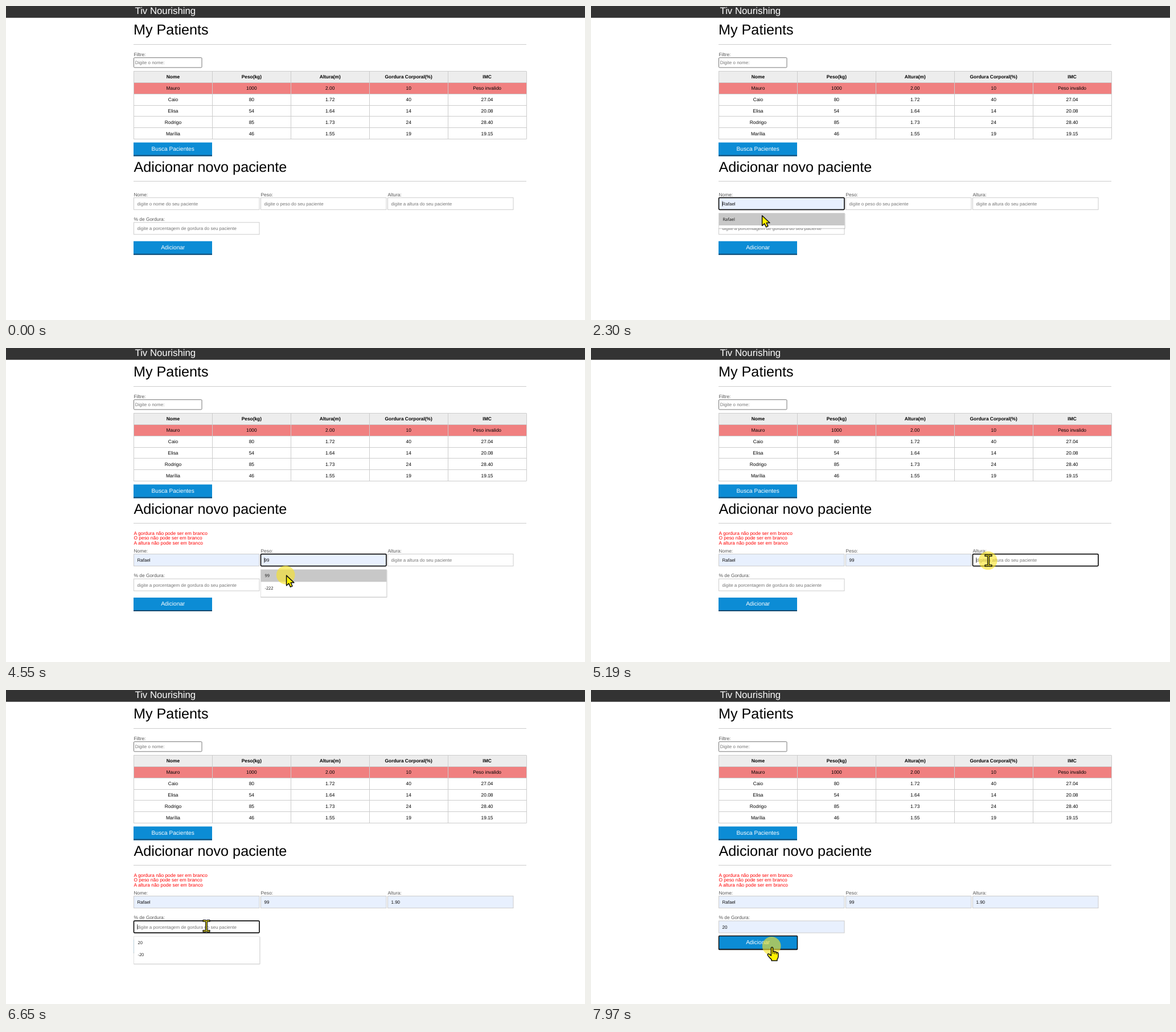
An HTML page for the animation above (8000 ms loop, 1017 by 551 pixels).

```html
<!DOCTYPE html>
<html lang="pt">
<head>
<meta charset="utf-8">
<title>Pacientes</title>
<style>
  html, body { margin: 0; width: 100%; height: 100%; overflow: hidden; background: #fff; }
  svg { display: block; width: 1017px; height: 551px; }
  text { font-family: "Liberation Sans", Arial, sans-serif; text-rendering: geometricPrecision; }
  .option { font-family: "Open Sans", "Noto Sans", sans-serif; }
</style>
</head>
<body>
<svg viewBox="0 0 1017 551"><g id="page"></g><g id="form"></g><g id="pointer"></g></svg>
<script>
const LOOP = 8000;
const LEFT = 224.5, RIGHT = 914, COL = (RIGHT - LEFT) / 5;
const FIELD_W = 221, FIELD_H = 21.5, OPTION_H = 21.5;
const ERRORS_AT = 3070, ERRORS_H = 25.3;

// Bursts of screen updates: first, last, count
const bursts = [
  [200, 970, 8], [1090, 1760, 7], [2080, 2860, 8], [2960, 3740, 8], [3860, 4650, 8],
  [4750, 5530, 8], [5650, 6410, 8], [6530, 7310, 8], [7410, 7970, 6]
];
const steps = [0];
for (const [first, last, count] of bursts)
  for (let i = 0; i < count; i++)
    steps.push(Math.floor((first + (last - first) * i / (count - 1)) / 10) * 10);

// Pointer path: time, x, y, shape from that time on
const path = [
  [200, 926, 470, "arrow"], [310, 835, 393, "arrow"], [420, 740, 352, "beam"],
  [530, 650, 345, "beam"], [640, 553, 366, "arrow"], [750, 478, 382, "arrow"],
  [860, 410, 365, "arrow"], [970, 362, 346, "beam"], [1200, 308, 346, "beam"],
  [1310, 306, 346, "beam"], [1420, 304, 389, "arrow"], [1760, 300, 367, "arrow"],
  [2520, 300, 367, "arrow"], [2740, 314, 404, "arrow"], [2860, 318, 418, "hand"],
  [3070, 318, 418, "beam"], [3290, 328, 405, "arrow"], [3510, 339, 390, "arrow"],
  [3740, 440, 376, "beam"], [3970, 476, 373, "beam"], [4190, 481, 390, "arrow"],
  [4420, 483, 399, "arrow"], [4750, 510, 397, "arrow"], [4970, 640, 377, "beam"],
  [5190, 698, 373, "beam"], [5410, 698, 390, "arrow"], [5650, 698, 399, "arrow"],
  [5860, 666, 405, "arrow"], [6190, 440, 414, "beam"], [6410, 355, 414, "beam"],
  [6640, 352, 414, "beam"], [6750, 349, 428, "arrow"], [7080, 346, 442, "arrow"],
  [7190, 346.5, 435, "beam"], [7310, 338, 442, "hand"], [7630, 318, 451, "hand"]
];
const clicks = [
  [1200, 1420], [2410, 2520], [2960, 3070], [3970, 4190], [4530, 4650],
  [5190, 5400], [5650, 5750], [6410, 6640], [7080, 7190], [7960, LOOP]
];

// when: focus, list opens, option hovered, option picked, blur
const fields = [
  { x: 224.5, y: 336, label: "Nome:", hint: "digite o nome do seu paciente",
    options: ["Rafael"], when: [1200, 1310, 1420, 2520, 2960] },
  { x: 447.5, y: 336, label: "Peso:", hint: "digite o peso do seu paciente",
    options: ["99", "-222"], when: [3970, 4080, 4190, 4650, 5190] },
  { x: 670.5, y: 336, label: "Altura:", hint: "digite a altura do seu paciente",
    options: ["1.90", "2.22"], when: [5190, 5300, 5410, 5750, 6410] },
  { x: 224.5, y: 379.5, label: "% de Gordura:", hint: "digite a porcentagem de gordura do seu paciente",
    options: ["20", "-20"], when: [6410, 6640, 6750, 7190, 7960] }
];
const errors = ["gordura", "peso", "altura"].map(
  name => `${name === "peso" ? "O" : "A"} ${name} não pode ser em branco`);
const table = [
  ["Nome", "Peso(kg)", "Altura(m)", "Gordura Corporal(%)", "IMC"],
  ["Mauro", "1000", "2.00", "10", "Peso invalido"],
  ["Caio", "80", "1.72", "40", "27.04"],
  ["Elisa", "54", "1.64", "14", "20.08"],
  ["Rodrigo", "85", "1.73", "24", "28.40"],
  ["Marília", "46", "1.55", "19", "19.15"]
];

const within = (t, [from, to]) => t >= from && t < to;
const rect = (x, y, w, h, fill, extra = "") =>
  `<rect x="${x}" y="${y}" width="${w}" height="${h}" fill="${fill}" ${extra}/>`;
const text = (x, y, size, fill, str, extra = "") =>
  `<text x="${x}" y="${y}" font-size="${size}" fill="${fill}" ${extra}>${str}</text>`;
const centred = 'text-anchor="middle"';
const line = (x1, y1, x2, y2) =>
  `<path d="M${x1} ${y1}L${x2} ${y2}" stroke="#ccc" stroke-width="1"/>`;

function button(y, label, focused = false) {
  return rect(224, y, 138, 24, "#0c8cd5") +
    rect(224, y + 22, 138, 2, "#154a72") +
    text(293.2, y + 14.2, 10.1, "#fff", label, centred) +
    (focused ? rect(224.5, y - .3, 138, 24, "none", 'rx="1.2" stroke="#101010" stroke-width="1.5"') : "");
}

function drawTable() {
  const top = 114.5, rowH = 119 / 6;
  let out = rect(LEFT, top, RIGHT - LEFT, rowH, "#ededed") +
    rect(LEFT, top + rowH, RIGHT - LEFT, rowH, "#f08080");
  for (let i = 0; i <= 6; i++) {
    const y = Math.round(top + rowH * i - .5) + .5;
    out += line(LEFT - .5, y, RIGHT, y);
  }
  for (let i = 0; i <= 5; i++) {
    const x = Math.floor(LEFT + COL * i) + .5;
    out += line(x, top, x, top + rowH * 6);
  }
  table.forEach((row, r) => row.forEach((cell, c) => {
    out += text(LEFT + COL * (c + .5), top + rowH * (r + .5) + 3, 8.4, "#000", cell,
      centred + (r ? "" : ' font-weight="bold"'));
  }));
  return out;
}

function drawPage() {
  return rect(0, 0, 1017, 20.7, "#333") +
    text(226.5, 14, 16.8, "#fff", "Tiv Nourishing") +
    text(224, 50.3, 25.2, "#000", "My Patients") +
    line(224, 67.5, RIGHT, 67.5) +
    text(224.5, 87.5, 8.4, "#555", "Filtre:") +
    rect(224.5, 90.7, 119.5, 17.3, "#fff", 'rx="1.2" stroke="#767676"') +
    text(226.8, 102, 8, "#757575", "Digite o nome:") +
    drawTable() +
    button(239.5, "Busca Pacientes") +
    text(224.5, 290.5, 25.2, "#000", "Adicionar novo paciente") +
    line(224, 307.5, RIGHT, 307.5);
}

function drawField({ x, y, label, hint, options, when }, t, shift) {
  const [focus, , hover, pick, blur] = when;
  const top = y + shift, filled = t >= hover, focused = within(t, [focus, blur]);
  const value = filled ? options[0] : hint;
  let out = text(x, top - 2.5, 8.4, "#555", label) +
    rect(x, top + .3, FIELD_W - .5, FIELD_H - .5, filled ? "#e8f0fe" : "#fff",
      focused ? 'rx="1.5" stroke="#101010" stroke-width="1.7"' : 'stroke="#ccc"') +
    text(x + 6, top + 13.9, 8, filled ? "#111" : "#757575", value);
  if (focused) {
    const caret = x + 6 + (t > pick ? options[0].replace(".", "").length * 4.45 + (options[0].includes(".") ? 2.2 : 0) : 0);
    out += rect(caret, top + 6.5, .8, 9, "#000");
  }
  return out;
}

function drawList({ x, y, options, when }, t, shift) {
  const [, open, hover, pick] = when;
  if (!within(t, [open, pick])) return "";
  const top = y + shift + FIELD_H + 6, h = OPTION_H * options.length + 5;
  return rect(x - .5, top + .8, FIELD_W + 1.5, h + .5, "#0003", 'rx="1"') +
    rect(x, top, FIELD_W, h, "#fff", 'stroke="#ddd" stroke-width=".6"') +
    (t >= hover ? rect(x, top, FIELD_W, OPTION_H, "#c8c8c8") : "") +
    options.map((o, i) =>
      text(x + 7, top + OPTION_H * i + 13.6, 7.4, "#111", o, 'class="option"')).join("");
}

function drawForm(t) {
  const shift = t >= ERRORS_AT ? ERRORS_H : 0;
  const pressed = within(t, [2960, ERRORS_AT]) || t >= 7960;
  const focused = within(t, [2960, 3970]) || t >= 7960;
  return (shift ? errors.map((e, i) => text(224.5, 327.8 + i * 8.4, 8.4, "#f00", e)).join("") : "") +
    fields.map(f => drawField(f, t, shift)).join("") +
    button(412.7 + shift - (pressed ? 6.2 : 0), "Adicionar", focused) +
    fields.map(f => drawList(f, t, shift)).join("");
}

const yellow = 'fill="#fff200" stroke="#111" stroke-width="1.5" stroke-linejoin="round"';
const shapes = {
  arrow: `<path d="M.6 .8V18.6L4.8 14.8L7.6 21L11 19.4L8.2 13.5H14Z" ${yellow}/>`,
  beam: `<path d="M-6-10.3H-1.8L0-9.5L1.8-10.3H6V-7.6H1.4V7.6H6V10.3H1.8L0 9.5L-1.8 10.3H-6V7.6H-1.4V-7.6H-6Z"
    fill="#e8dc20" stroke="#111" stroke-width="1.3" stroke-linejoin="round"/>`,
  hand: `<path d="M-1.6 1.5Q0-1 1.6 1.5V8Q3.5 6.5 4.8 8.7Q6.8 7.6 8 9.8Q10.8 9 11 12V17Q10.6 20 9 21.5V24H-1V21.8
    Q-5 18.5-7.6 14.6Q-8.6 11.5-5.5 12.2L-1.6 15.2Z" ${yellow}/>
    <path d="M1.6 8V12M4.8 8.7V12.5M8 9.8V13" stroke="#111" stroke-width="1.1"/>`
};

function drawPointer(t) {
  if (t < path[0][0]) return "";
  const i = path.findLastIndex(p => p[0] <= t);
  const [t0, x0, y0, shape] = path[i];
  const [t1, x1, y1] = path[i + 1] || [LOOP, x0, y0];
  const k = (t - t0) / (t1 - t0);
  const x = x0 + (x1 - x0) * k, y = y0 + (y1 - y0) * k;
  const halo = clicks.some(c => within(t, c))
    ? `<circle cx="-.8" cy="${shape === "hand" ? -1.8 : 0}" r="16.3" fill="#f8e428" fill-opacity=".62"/>` : "";
  return `<g transform="translate(${x} ${y})">${halo}${shapes[shape]}</g>`;
}

const byId = id => document.getElementById(id);
byId("page").innerHTML = drawPage();
const start = performance.now();
let shown = -1;

function frame() {
  const now = (performance.now() - start) % LOOP;
  const t = steps.findLast(s => s <= now);
  if (t !== shown) {
    shown = t;
    byId("form").innerHTML = drawForm(t);
    byId("pointer").innerHTML = drawPointer(t);
  }
  requestAnimationFrame(frame);
}
frame();
</script>
</body>
</html>
```
